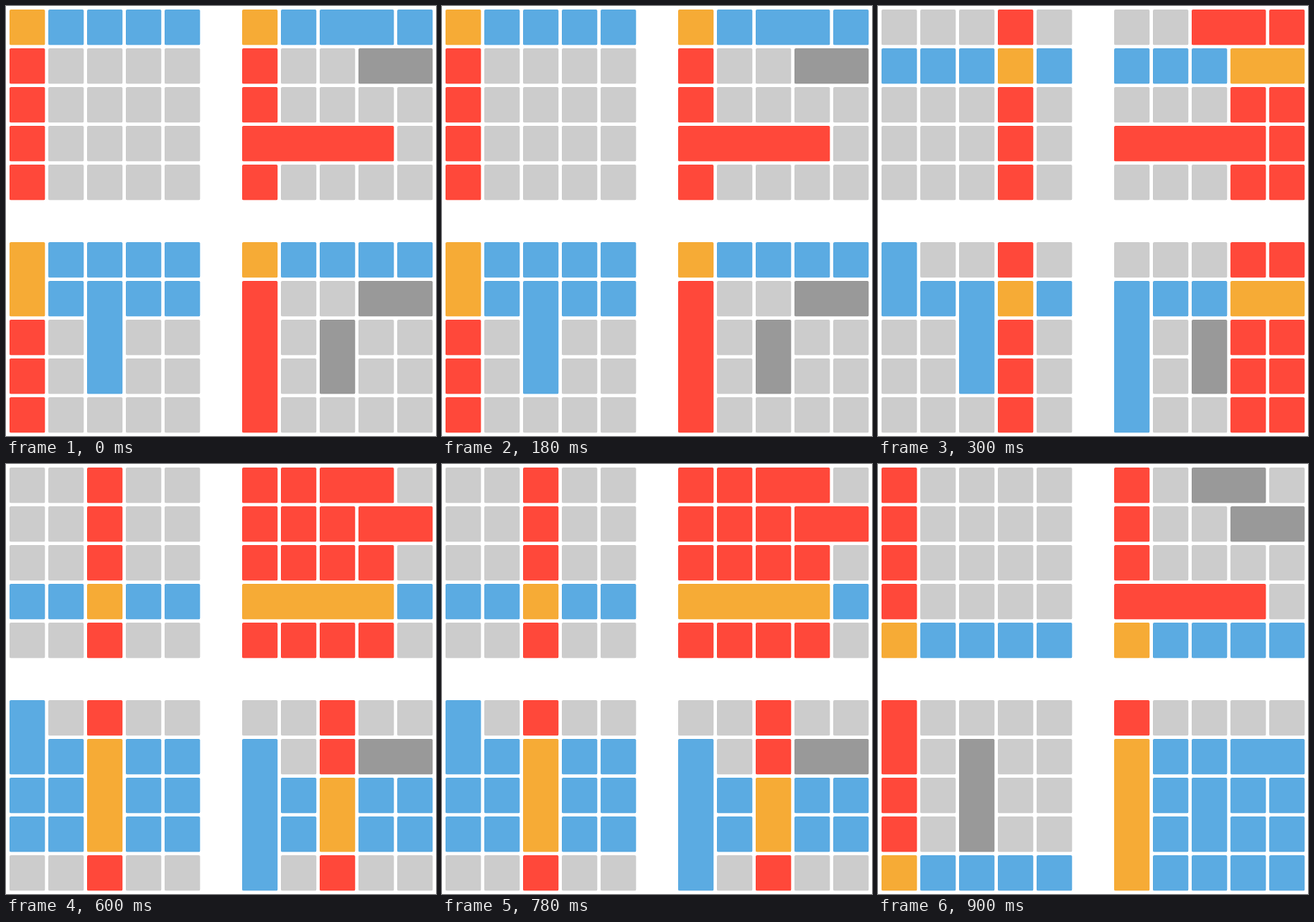
These frames come from a looping animation (488 px wide and 488 px high, 1.2 s). An HTML page with a canvas:

```html
<!DOCTYPE html>
<html>
<head>
<meta charset="utf-8">
<style>
  html, body { margin: 0; width: 100%; height: 100%; overflow: hidden; background: #fff; }
  canvas { display: block; }
</style>
</head>
<body>
<canvas id="stage" width="488" height="488"></canvas>
<script>
const ctx = document.getElementById('stage').getContext('2d');
const SIZE = 5, PITCH = 44, GAP = 3.75, MARGIN = 4, TABLE_PITCH = 6 * PITCH, STEP = 300;
const COLORS = { picked: '#f6ab36', row: '#5babe2', col: '#ff483a', plain: '#ccc', merged: '#999' };

const wide = (r, c, w) => ({ r, c, h: 1, w });
const tall = (r, c, h) => ({ r, c, h, w: 1 });

// All tables follow one pointer; a merged cell is picked wherever it is touched.
const path = [wide(0, 0, 1), wide(1, 3, 1), wide(3, 2, 1), wide(4, 0, 1)];
const tables = [
  [],
  [wide(0, 2, 2), wide(1, 3, 2), wide(3, 0, 4)],
  [tall(0, 0, 2), tall(1, 2, 3)],
  [tall(1, 0, 4), wide(1, 3, 2), tall(2, 2, 2)]
].map(fillGrid);

function sharesRow(a, b) { return a.r < b.r + b.h && b.r < a.r + a.h; }
function sharesCol(a, b) { return a.c < b.c + b.w && b.c < a.c + a.w; }
function touches(a, b) { return sharesRow(a, b) && sharesCol(a, b); }

function fillGrid(merged) {
  const cells = [...merged];
  for (let i = 0; i < SIZE * SIZE; i++) {
    const cell = wide(Math.floor(i / SIZE), i % SIZE, 1);
    if (!merged.some(other => touches(other, cell))) cells.push(cell);
  }
  return cells;
}

function cellColor(cell, picked) {
  if (cell === picked) return COLORS.picked;
  if (sharesRow(cell, picked)) return COLORS.row;
  if (sharesCol(cell, picked)) return COLORS.col;
  return cell.w * cell.h > 1 ? COLORS.merged : COLORS.plain;
}

function drawTable(cells, index, pointer) {
  const x = MARGIN + index % 2 * TABLE_PITCH;
  const y = MARGIN + Math.floor(index / 2) * TABLE_PITCH;
  const picked = cells.find(cell => touches(cell, pointer));
  for (const cell of cells) {
    ctx.fillStyle = cellColor(cell, picked);
    ctx.beginPath();
    ctx.roundRect(x + cell.c * PITCH, y + cell.r * PITCH,
      cell.w * PITCH - GAP, cell.h * PITCH - GAP, 1.5);
    ctx.fill();
  }
}

function draw() {
  const pointer = path[Math.floor(performance.now() / STEP) % path.length];
  ctx.clearRect(0, 0, 488, 488);
  tables.forEach((cells, index) => drawTable(cells, index, pointer));
  requestAnimationFrame(draw);
}

draw();
</script>
</body>
</html>
```
